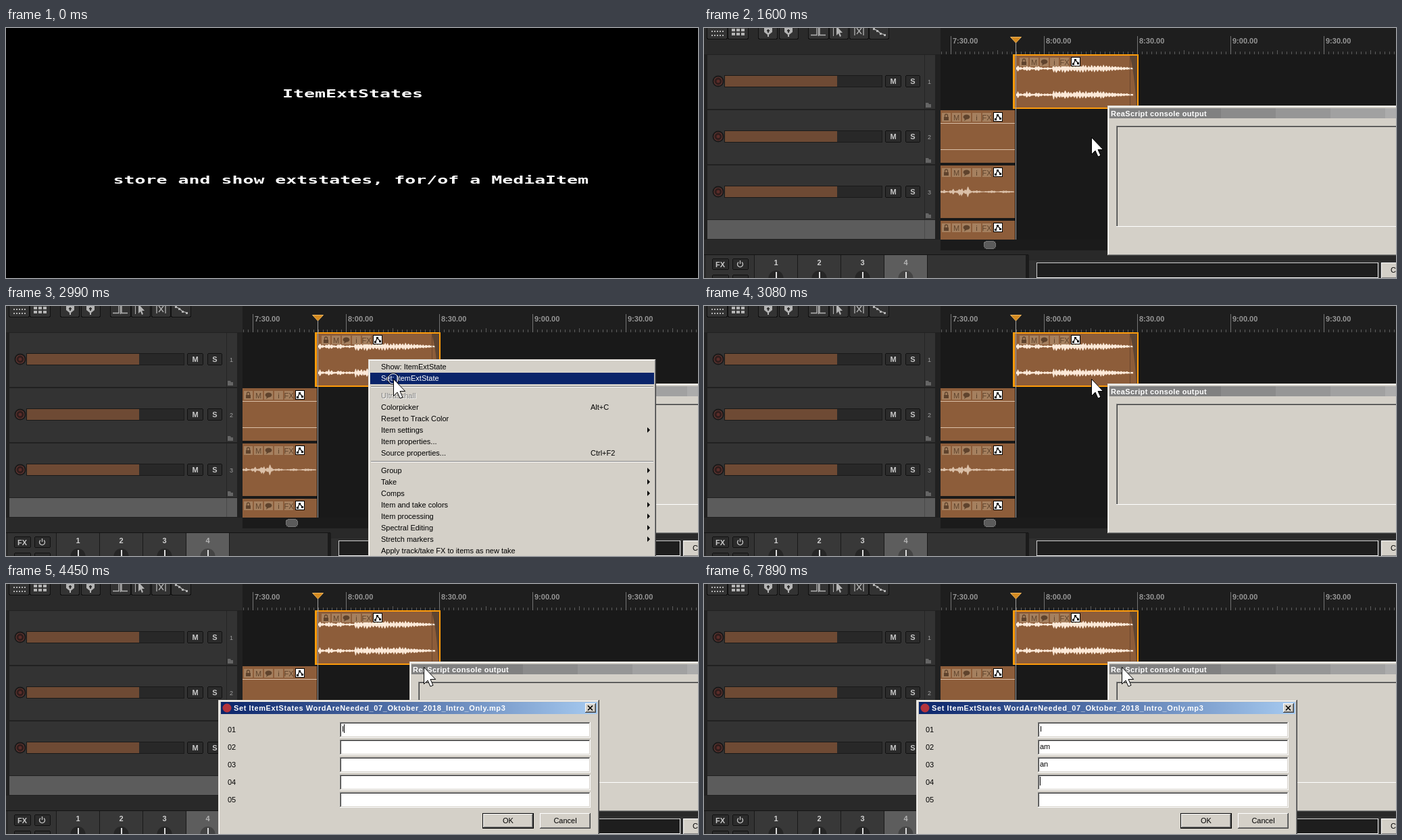
Animation, 1024 px wide and 371 px high, one loop 8 s. Source, as an HTML page:

```html
<!DOCTYPE html>
<html lang="en">
<head>
<meta charset="utf-8">
<title>ItemExtStates</title>
<style>
html, body { margin: 0; width: 100%; height: 100%; overflow: hidden; background: #000; }
svg { display: block; width: 100%; height: 100%; }
text { font-family: "Liberation Sans", Arial, sans-serif; font-size: 11px; white-space: pre; }
rect { shape-rendering: crispEdges; }
.b { font-weight: 700; }
.wide { font: 700 16px "DejaVu Sans Mono", monospace; }
</style>
</head>
<body>
<svg id="stage" viewBox="0 0 1024 371" preserveAspectRatio="none"></svg>
<script>
const FACE = '#d4d0c8', BROWN = '#8d5d3a', NAVY = '#0a246a';
const stage = document.getElementById('stage');

const rect = (x, y, w, h, fill, extra = '') =>
  `<rect x="${x}" y="${y}" width="${w}" height="${h}" fill="${fill}" ${extra}/>`;
const text = (x, y, s, fill = '#000', extra = '') =>
  `<text x="${x}" y="${y}" fill="${fill}" ${extra}>${s}</text>`;
const path = (d, fill = 'none', extra = '') => `<path d="${d}" fill="${fill}" ${extra}/>`;
const circle = (x, y, r, fill, extra = '') =>
  `<circle cx="${x}" cy="${y}" r="${r}" fill="${fill}" ${extra}/>`;
const group = (id, body) => `<g id="${id}">${body}</g>`;
const range = (n, f) => Array.from({ length: n }, (_, i) => f(i)).join('');
const mid = 'text-anchor="middle"';

// One-pixel frame: top/left in one colour, bottom/right in another
const edge = (x, y, w, h, light, dark) =>
  rect(x, y, w, 1, light) + rect(x, y, 1, h, light) +
  rect(x, y + h - 1, w, 1, dark) + rect(x + w - 1, y, 1, h, dark);
const raised = (x, y, w, h) => rect(x, y, w, h, FACE) +
  edge(x, y, w, h, '#fff', '#404040') + edge(x + 1, y + 1, w - 2, h - 2, FACE, '#808080');
const sunken = (x, y, w, h, fill) => rect(x, y, w, h, fill) +
  edge(x, y, w, h, '#808080', '#fff') + edge(x + 1, y + 1, w - 2, h - 2, '#404040', FACE);
const windowFrame = (x, y, w, h) => rect(x, y, w, h, FACE) +
  edge(x, y, w, h, FACE, '#404040') + edge(x + 1, y + 1, w - 2, h - 2, '#fff', '#808080');

function random(seed) {
  return () => (seed = (seed * 16807) % 2147483647) / 2147483647;
}

// Envelope is a list of [x, amplitude] points
function wave(env, cy, seed, fill) {
  const rnd = random(seed), top = [], low = [];
  for (let i = 0; i < env.length - 1; i++) {
    const [x0, a0] = env[i], [x1, a1] = env[i + 1];
    for (let x = x0; x < x1; x++) {
      const a = a0 + (a1 - a0) * (x - x0) / (x1 - x0);
      const beat = .2 + .8 * Math.abs(Math.sin(x * .72));
      top.push(`${x} ${(cy - .4 - a * beat * (.5 + .5 * rnd())).toFixed(1)}`);
      low.unshift(`${x} ${(cy + .6 + a * beat * (.5 + .5 * rnd())).toFixed(1)}`);
    }
  }
  return path('M' + top.concat(low).join('L') + 'Z', fill);
}

function itemIcons(x, y) {
  const ink = '#5f432d', tile = i => rect(x + 15 * i, y, 13, 13, '#a5805f', 'rx="1"');
  const label = (i, s) => text(x + 15 * i + 6.5, y + 10.5, s, ink, mid);
  return range(5, tile) +
    rect(x + 3, y + 6, 7, 5, ink) + path(`M${x + 4.5} ${y + 6}v-2a2 2 0 0 1 4 0v2`, 'none', `stroke="${ink}" stroke-width="1.3"`) +
    label(1, 'M') +
    `<ellipse cx="${x + 36.5}" cy="${y + 6}" rx="5" ry="3.5" fill="${ink}"/>` + path(`M${x + 34} ${y + 8}l-1 4l4-3z`, ink) +
    label(3, 'i') + label(4, 'FX') +
    rect(x + 76, y - 1, 14, 14, '#000') + rect(x + 77, y, 12, 12, '#fff') +
    path(`M${x + 79.5} ${y + 9.5}L${x + 82.5} ${y + 3.5}L${x + 87} ${y + 8.5}`, 'none', 'stroke="#000" stroke-width="1.2"') +
    [[78, 8], [81, 2], [85, 7]].map(([a, b]) => rect(x + a, y + b, 3, 3, '#000')).join('');
}

function toolbar() {
  const ink = '#b4b4b4', line = `stroke="${ink}" stroke-width="1.3"`;
  const button = ([x, w]) => `<rect x="${x + .5}" y="-5.5" width="${w}" height="22" rx="3" fill="#333" stroke="#111"/>`;
  const shield = x => path(`M${x - 6} 0h12v6l-5 4v3h-2v-3l-5-4z`, ink) + rect(x - 1, 2, 2, 5, '#333') + rect(x - 2, 3, 4, 2, '#333');
  return rect(0, 0, 350, 39, '#2a2a2a') +
    [[4, 30], [35, 30], [80, 28], [111, 28], [154, 30], [185, 28], [215, 28], [244, 29]].map(button).join('') +
    range(10, i => rect(11 + i % 5 * 4, 4 + (i / 5 | 0) * 6, 2, 2, ink)) +
    range(6, i => rect(41 + i % 3 * 7, 1 + (i / 3 | 0) * 6, 5, 4, ink)) +
    shield(95) + shield(125) +
    path('M158 10.5h9V0M180 10.5h-9V0M169.5 0v12', 'none', line) +
    path('M196 -3v14l3-3l2 5l2-1l-2-5h4z', ink) + rect(191, 0, 1, 12, ink) +
    path('M223 0v11M236 0v11M226 0l7 9M233 0l-7 9', 'none', line) +
    path('M250 1l7 3l4 4l7 2', 'none', line) +
    [[250, 0], [255, 3], [260, 7], [266, 9]].map(([x, y]) => rect(x, y, 3, 3, ink)).join('');
}

function track(i) {
  const y = 40 + 82 * i, cy = y + 39;
  const button = (x, w, s) =>
    `<rect x="${x + .5}" y="${cy - 8.5}" width="${w}" height="17" rx="2" fill="#2b2b2b" stroke="#111"/>` +
    text(x + w / 2 + .5, cy + 4, s, '#c8c8c8', mid + ' class="b"');
  return rect(5, y, 337, 80, '#333') +
    circle(21, cy, 8.5, '#191919') + circle(21, cy, 6, '#2e1d1c', 'stroke="#5f3531" stroke-width="1.2"') + circle(21, cy, 2.5, '#5a2c29') +
    rect(30, cy - 9, 234, 18, '#1a1a1a') + rect(31, cy - 8, 232, 16, '#282828') + rect(31, cy - 8, 166, 16, '#6e4a34') +
    button(268, 23, 'M') + button(298, 21, 'S') + rect(326, y, 1, 80, '#252525') +
    text(333.5, cy + 4, i + 1, '#a0a0a0', mid + ' style="font-size:9px"') +
    path(`M328 ${y + 78}v-7h4l1 2h3v5z`, '#656565');
}

function ruler() {
  return rect(350, 0, 674, 39, '#1e1e1e') +
    range(98, i => {
      const h = (i + 8) % 10 ? 4 : 6;
      return rect(Math.round(351.2 + i * 6.9), 39 - h, 1, h, '#5d5d5d');
    }) +
    ['7:30.00', '8:00.00', '8:30.00', '9:00.00', '9:30.00'].map((s, i) =>
      rect(365 + 138 * i, 12, 1, 27, '#747474') + text(368 + 138 * i, 23, s, '#969696', 'class="b"')).join('');
}

function items() {
  const speech = [[461, 2], [464, 5], [471, 1], [478, 5], [484, 3], [487, 1], [493, 5], [501, 1], [508, 2], [515, 1],
    [517, 7], [528, 5], [534, 7], [546, 4], [553, 7], [568, 5], [588, 6], [600, 4], [615, 3], [636, 1]];
  const mumble = [[350, 1], [355, 3], [361, 0], [369, 5], [373, 1], [380, 9], [385, 2], [391, 10], [395, 1],
    [405, 2], [413, 0], [427, 2], [434, 0], [444, 2], [460, 0]];
  const pale = '#dbc0a8';
  return rect(350, 39, 674, 275, '#191919') +
    [[122, 78], [204, 78], [286, 28]].map(([y, h]) =>
      rect(350, y, 110, h, BROWN) + itemIcons(352, y + 4)).join('') +
    rect(350, 141, 110, 1, pale) + rect(350, 180, 110, 1, pale) + wave(mumble, 243, 31, pale) +
    rect(457, 39, 186, 81, '#ff9c0a') + rect(460, 41, 181, 77, BROWN) +
    wave(speech, 60, 7, '#fce9d8') + wave(speech, 99, 19, '#fce9d8') + itemIcons(467, 44) +
    path('M630 41Q637 65 640 118H641V41Z', '#4f3d30', 'opacity=".75"') + rect(630, 41, 1, 77, '#69462d') +
    rect(461, 22, 1, 292, '#a0a0a0') +
    path('M453.5 13.5h16l-8 8.5z', '#d48a20', 'stroke="#f0b65c" stroke-width="1"');
}

function mixer() {
  const small = (x, y, w) => `<rect x="${x + .5}" y="${y + .5}" width="${w}" height="16" rx="2" fill="#2b2b2b" stroke="#111"/>`;
  return rect(0, 314, 1024, 57, '#292929') + rect(350, 314, 674, 16, '#1b1b1b') +
    '<rect x="414.5" y="316.5" width="17" height="11" rx="4" fill="#5b5b5b" stroke="#777"/>' +
    rect(0, 336, 480, 1, '#141414') + rect(3, 337, 473, 34, '#333') +
    small(12, 342, 24) + text(24, 355, 'FX', '#c8c8c8', mid + ' class="b"') + small(42, 342, 23) +
    path('M51 347.5a4 4 0 1 0 5 0M53.5 345v5', 'none', 'stroke="#c8c8c8" stroke-width="1.3"') +
    small(12, 366, 24) + small(42, 366, 23) +
    range(4, i => {
      const x = 75 + 64 * i, c = x + 31.5, chosen = i === 3;
      return rect(x, 337, 63, 34, chosen ? '#5d5d5d' : '#383838') + rect(x + 63, 337, 1, 34, '#191919') +
        text(c, 352, i + 1, chosen ? '#b4b4b4' : '#d0d0d0', mid + ' class="b"') +
        circle(c, 371, 11, chosen ? '#444' : '#262626') + rect(c - .5, 362, 2, 9, '#ddd');
    }) +
    rect(74, 337, 1, 34, '#191919') + rect(476, 337, 5, 34, '#1b1b1b') + rect(481, 345, 543, 26, '#303030') +
    rect(492, 348, 506, 23, '#1e1e1e') + edge(492, 348, 506, 23, '#d0d0d0', '#fff') +
    raised(1002, 348, 40, 24) + text(1016, 363, 'C');
}

function consoleWindow() {
  return windowFrame(597, 115, 440, 223) +
    range(5, i => {
      const v = 128 + 11 * i;
      return rect(i ? 684 + 81 * i : 600, 119, 166, 15, `rgb(${v},${v},${v})`);
    }) +
    text(602, 131, 'ReaScript console output', '#fff', 'class="b" letter-spacing=".37"') +
    rect(610, 145, 420, 150, '#808080') + rect(611, 146, 420, 148, '#404040') +
    rect(612, 147, 420, 147, FACE) + rect(610, 294, 420, 1, '#fff');
}

function menu() {
  const rows = [
    [90, 'Show: ItemExtState'], [107, 'Set: ItemExtState'], [133, 'Ultraschall'],
    [150, 'Colorpicker', 'Alt+C'], [167, 'Reset to Track Color'], [184, 'Item settings', '>'],
    [201, 'Item properties...'], [218, 'Source properties...', 'Ctrl+F2'],
    [244, 'Group', '>'], [261, 'Take', '>'], [278, 'Comps', '>'], [295, 'Item and take colors', '>'],
    [312, 'Item processing', '>'], [329, 'Spectral Editing', '>'], [346, 'Stretch markers', '>'],
    [363, 'Apply track/take FX to items as new take']
  ];
  const rule = y => rect(540, y, 418, 1, '#808080') + rect(540, y + 1, 418, 1, '#fff');
  return windowFrame(536, 79, 426, 310) + `<rect id="bar" x="539" width="420" height="17" fill="${NAVY}"/>` +
    rule(119) + rule(230) +
    rows.map(([y, s, hint], i) => {
      const grey = y === 133;
      return (grey ? text(556, y + 5, s, '#fff') : '') +
        text(555, y + 4, s, grey ? '#808080' : '#000', `id="row${i}"`) +
        (hint === '>' ? path(`M949 ${y - 4}v8l4-4z`, '#000') : hint ? text(865, y + 4, hint) : '');
    }).join('');
}

function dialog() {
  return windowFrame(314, 172, 564, 215) + rect(318, 175, 557, 18, 'url(#caption)') +
    circle(327, 184, 6.5, '#b5343c') +
    text(337, 188, 'Set ItemExtStates WordAreNeeded_07_Oktober_2018_Intro_Only.mp3', '#fff', 'class="b" letter-spacing=".6"') +
    raised(857, 177, 16, 14) + path('M861 180.5l7 7M868 180.5l-7 7', 'none', 'stroke="#000" stroke-width="1.6"') +
    range(5, i => text(328, 220 + 26 * i, '0' + (i + 1)) + sunken(494, 205 + 26 * i, 371, 23, '#fff') +
      text(497, 219 + 26 * i, '', '#000', `id="field${i}"`)) +
    rect(705, 340, 76, 23, '#000') + raised(706, 341, 74, 21) + text(743, 355, 'OK', '#000', mid) +
    raised(790, 340, 75, 23) + text(827.5, 355, 'Cancel', '#000', mid) +
    '<rect id="caret" width="1" height="13"/>';
}

const wideText = (x, y, s) =>
  `<text class="wide" fill="#fff" transform="translate(${x} ${y}) scale(1.661 1)">${s}</text>`;

stage.innerHTML =
  `<defs><linearGradient id="caption"><stop stop-color="${NAVY}"/><stop offset="1" stop-color="#a6caf0"/></linearGradient></defs>` +
  group('intro', rect(0, 0, 1024, 371, '#000') + wideText(409, 102.5, 'ItemExtStates') +
    wideText(158.5, 230.5, 'store and show extstates, for/of a MediaItem')) +
  group('desk', rect(0, 0, 1024, 371, '#212121') + toolbar() + range(3, track) +
    rect(5, 285, 337, 28, '#5c5c5c') + rect(326, 285, 1, 28, '#4a4a4a') + ruler() + items() + mixer() + consoleWindow()) +
  group('menu', menu()) + group('dialog', dialog()) +
  group('ring', circle(0, 0, 8.5, 'none', 'stroke="#000"') + circle(0, 0, 7.5, 'none', 'stroke="#fff"')) +
  group('mouse', path('M.5 .5V25.5L6 20L10 29L14 27.3L10 18.5H17.7Z', '#fff', 'stroke="#000" stroke-width="1"'));

const $ = id => document.getElementById(id);
const show = (id, on) => $(id).setAttribute('display', on ? 'inline' : 'none');
const place = (id, [x, y]) => $(id).setAttribute('transform', `translate(${x} ${y})`);

// Mouse moves in even jumps: start, end, number of jumps, from, to
const moves = [
  [1060, 1710, 8, [665, 350], [536, 87]],
  [2490, 2810, 4, [545, 92], [573, 108]],
  [3360, 3720, 5, [582, 111], [618, 123]]
];
// Typing: time, caret row (-1 hidden), caret x, texts of the rows
const typing = [
  [0, 0, 497], [3720, -1, 0], [4270, 0, 500, 'I'], [4830, -1, 0, 'I'], [4920, 1, 497, 'I'],
  [5470, 1, 503, 'I', 'a'], [5700, 1, 512, 'I', 'am'], [5990, 2, 497, 'I', 'am'],
  [6360, 2, 503, 'I', 'am', 'a'], [6550, 2, 509, 'I', 'am', 'an'], [7040, 2, 512, 'I', 'am', 'an '],
  [7540, -1, 0, 'I', 'am', 'an '], [7720, 2, 509, 'I', 'am', 'an'], [7890, 3, 497, 'I', 'am', 'an']
];
const within = (t, spans) => spans.some(([a, b]) => t >= a && t < b);
const hidden = [[0, 1060], [4270, 4450], [5470, 5790], [6360, 6550], [7040, 7230]];

function mouseAt(t) {
  const [a, b, n, from, to] = moves.filter(m => t >= m[0]).pop() || moves[0];
  const k = Math.max(0, Math.min(n - 1, Math.floor((t - a) / (b - a) * (n - 1) + .01)));
  return from.map((v, i) => Math.round(v + (to[i] - v) * k / (n - 1)));
}

function draw(t) {
  // Before the first jump towards the dialog the mouse rests on the menu entry
  const mouse = mouseAt(t);
  show('intro', t < 500);
  show('desk', t >= 500);
  show('menu', within(t, [[1990, 3080]]));
  show('dialog', t >= 3270);
  show('ring', within(t, [[1910, 1990], [2990, 3080]]));
  show('mouse', !within(t, hidden));
  place('mouse', mouse);
  place('ring', mouse);

  const hot = t < 2490 ? -1 : mouse[1] < 99 ? 0 : 1;
  show('bar', hot >= 0);
  $('bar').setAttribute('y', 82 + 17 * Math.max(0, hot));
  for (const i of [0, 1]) $('row' + i).setAttribute('fill', i === hot ? '#fff' : '#000');

  const [, row, x, ...lines] = typing.filter(s => t >= s[0]).pop();
  for (let i = 0; i < 5; i++) $('field' + i).textContent = lines[i] || '';
  show('caret', row >= 0);
  $('caret').setAttribute('x', x);
  $('caret').setAttribute('y', 208 + 26 * Math.max(0, row));
}

const begin = performance.now();
function tick() {
  draw((performance.now() - begin) % 8000);
  requestAnimationFrame(tick);
}
draw(0);
requestAnimationFrame(tick);
</script>
</body>
</html>
```
